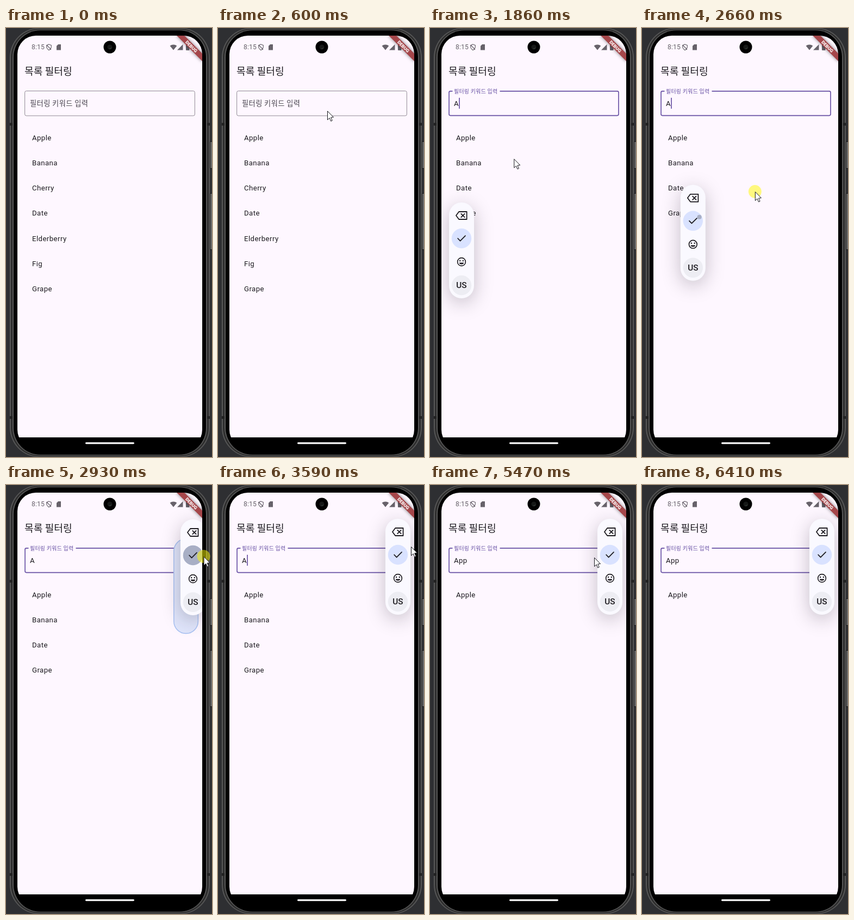
Write an HTML page with a canvas that moves like this. It is 379 by 787 pixels and loops after 6.61 s.

```html
<!DOCTYPE html>
<html lang="ko">
<head>
<meta charset="utf-8">
<title>List filtering</title>
<style>
html, body { margin: 0; width: 100%; height: 100%; overflow: hidden; background: #2e2f32; }
canvas { display: block; width: 379px; height: 787px; }
</style>
</head>
<body>
<canvas id="stage"></canvas>
<script>
const W = 379, H = 787, LOOP = 6610, TICK = 1000 / 15;
const SCREEN = { x: 21, y: 14, w: 340, h: 737 };
const DP = SCREEN.w / 411.4;
const BODY = 16 * DP, SPACING = 0.5 * DP;

const LATIN = 'Roboto, "Noto Sans", sans-serif';
const KOREAN = '"Noto Sans CJK KR", "Noto Sans CJK", "Noto Sans CJK JP", sans-serif';
const BG = '#fef7ff', INK = '#1d1b20', ACCENT = '#6750a4', STATUS = '#67626a';

const FRUITS = ['Apple', 'Banana', 'Cherry', 'Date', 'Elderberry', 'Fig', 'Grape'];
const KEYWORD = 'App', KEY_TIMES = [1400, 4195, 4660];
const CLICK = 860, FOCUS = 920, PANEL_IN = 990, GRAB = 2400, DOCK = 2933, DROP = 3060;

// Pointer stops: [time, x, y].
const STOPS = [
  [66, 364, 749], [470, 191, 106], [600, 201, 152], [1530, 201, 152], [2200, 108, 327],
  [GRAB, 77, 389], [2667, 208, 300], [2900, 364, 132], [3600, 355, 113],
  [5070, 355, 113], [5270, 304, 127], [5470, 302, 133], [6067, 341, 516], [6340, 352, 775]
];

const canvas = document.getElementById('stage');
const dpr = window.devicePixelRatio || 1;
canvas.width = W * dpr;
canvas.height = H * dpr;
const ctx = canvas.getContext('2d');

const clamp = v => Math.max(0, Math.min(1, v));
const ramp = (t, from, length) => clamp((t - from) / length);
const easeOut = p => 1 - (1 - p) ** 3;
const mix = (a, b, p) => a + (b - a) * p;

function box(x, y, w, h, r, fill) {
  ctx.beginPath();
  ctx.roundRect(x, y, w, h, r);
  if (fill) {
    ctx.fillStyle = fill;
    ctx.fill();
  }
}

function rect(x, y, w, h, fill) {
  ctx.fillStyle = fill;
  ctx.fillRect(x, y, w, h);
}

function disc(x, y, r, fill) {
  ctx.beginPath();
  ctx.arc(x, y, r, 0, 7);
  ctx.fillStyle = fill;
  ctx.fill();
}

function trace(points, close) {
  ctx.beginPath();
  points.forEach(([x, y]) => ctx.lineTo(x, y));
  if (close) ctx.closePath();
}

function poly(points, fill) {
  trace(points, true);
  ctx.fillStyle = fill;
  ctx.fill();
}

function stroke(color, width) {
  ctx.strokeStyle = color;
  ctx.lineWidth = width;
  ctx.stroke();
}

function label(text, x, y, font, color, spacing = 0) {
  ctx.font = font;
  ctx.letterSpacing = spacing + 'px';
  ctx.fillStyle = color;
  ctx.fillText(text, x, y);
}

function drawPhone() {
  rect(0, 0, W, H, '#2e2f32');
  for (const [y, h] of [[208, 50], [303, 104]]) {
    rect(375, y, 4, h, '#1c1c1d');
    rect(376, y + 1, 3, h - 2, '#666');
  }
  // The metal rim is light at both edges and dark between them.
  const rim = 7;
  for (let i = 0; i <= rim; i++) {
    const shade = i === rim ? 0 : 38 + 55 * Math.cos(i / (rim - 1) * Math.PI) ** 2;
    const x = 7 + i, y = i * 0.6;
    box(x, y, 382 - 2 * x, H - 2 * y, 54 - i * 0.7, `rgb(${shade},${shade},${shade})`);
  }
  for (const y of [174, 712]) {
    for (const x of [7, 370]) rect(x, y, 5, 5, '#222');
  }
}

function drawStatus() {
  label('8:15', 47, 39.3, '12.2px ' + LATIN, STATUS, 0.1);
  ctx.beginPath();
  ctx.moveTo(79, 30);
  ctx.lineTo(83.3, 31.6);
  ctx.quadraticCurveTo(84, 38, 79, 40.6);
  ctx.quadraticCurveTo(74, 38, 74.7, 31.6);
  ctx.closePath();
  ctx.moveTo(75, 31.5);
  ctx.lineTo(83, 39.5);
  stroke(STATUS, 1.2);

  poly([[96, 30], [101, 30], [101, 40.5], [93, 40.5], [93, 33]], STATUS);
  ctx.beginPath();
  ctx.moveTo(308, 40.5);
  ctx.arc(308, 40.5, 10, -Math.PI * 0.72, -Math.PI * 0.28);
  ctx.fillStyle = STATUS;
  ctx.fill();
  poly([[325.5, 30], [325.5, 40.5], [315, 40.5]], STATUS);
  box(331, 30, 6.5, 11, 1, STATUS);

  disc(191, 35, 11.5, '#000');
  disc(191, 35, 4.6, '#161817');
  ctx.beginPath();
  ctx.arc(191, 35, 3, 0.3, 2);
  stroke('#3d4541', 1);
}

function drawBanner() {
  ctx.save();
  ctx.translate(SCREEN.x + SCREEN.w, SCREEN.y);
  ctx.rotate(Math.PI / 4);
  ctx.shadowColor = 'rgba(0,0,0,.5)';
  ctx.shadowBlur = 6 * dpr;
  rect(-40 * DP, 28 * DP, 80 * DP, 12 * DP, '#a5464a');
  ctx.shadowColor = 'transparent';
  ctx.textAlign = 'center';
  label('DEBUG', 0, 31.2, `900 ${10.2 * DP}px ${LATIN}`, '#fff');
  ctx.restore();
}

function drawField(t, text, since) {
  const p = easeOut(ramp(t, FOCUS, 170));
  const line = mix(DP, 2 * DP, p), inset = line / 2;
  box(34.2 + inset, 115.1 + inset, 313.6 - line, 46.3 - line, 4 * DP - inset);
  stroke(p > 0 ? ACCENT : '#79747e', line);
  if (p > 0) rect(41.5, 113, 87 * p, 5, BG);

  const size = mix(1, 0.75, p);
  label('필터링 키워드 입력', 44, mix(143.2, 120, p), `${BODY * size}px ${KOREAN}`,
    p > 0 ? ACCENT : '#49454f', SPACING * size);
  label(text, 44, 143, `${BODY}px ${LATIN}`, INK, SPACING);
  if (p > 0 && (t - since) % 1000 < 500) {
    rect(44.2 + ctx.measureText(text).width, 128, 2 * DP, 20, ACCENT);
  }
}

function drawList(text) {
  const key = text.toLowerCase();
  FRUITS.filter(name => name.toLowerCase().includes(key)).forEach((name, i) =>
    label(name, 48, 205.6 + i * 56 * DP, `${BODY}px ${LATIN}`, INK, SPACING));
}

function drawDropZone(t) {
  if (t < DOCK - 30) return;
  ctx.globalAlpha = 1 - ramp(t, DROP, 150);
  box(308.8, 98.8, 44.6, 173.6, 22.3, '#e0e5fb');
  stroke('#abc3f3', 1.6);
  ctx.globalAlpha = 1;
}

function drawSmile(y) {
  ctx.beginPath();
  ctx.arc(0, y, 7.4, 0, 7);
  stroke(INK, 1.65);
  for (const x of [-2.9, 2.9]) disc(x, y - 2, 1.25, INK);
  ctx.beginPath();
  ctx.ellipse(0, y + 1.6, 4.2, 2.9, 0, 0, Math.PI);
  ctx.fillStyle = INK;
  ctx.fill();
}

function drawBackspace(y) {
  trace([[-10, y], [-4.8, y - 7], [9.6, y - 7], [9.6, y + 7], [-4.8, y + 7]], true);
  stroke(INK, 1.8);
  for (const s of [-3.2, 3.2]) {
    trace([[-0.7, y - s], [5.7, y + s]]);
    stroke(INK, 1.8);
  }
}

function drawCheck(t, y) {
  disc(0, y, 18.2, '#d9e2ff');
  const press = ramp(t, 2630, 170) * (1 - ramp(t, DROP, 200));
  if (press > 0) {
    ctx.save();
    ctx.clip();
    disc(15 * (1 - press), y - 9 * (1 - press), 19 * press, '#a8afc5');
    ctx.restore();
  }
  trace([[-6.8, y], [-2.4, y + 4.6], [7, y - 4.8]]);
  stroke(INK, 1.8);
}

function drawPanel(t) {
  if (t < PANEL_IN) return;
  const shown = easeOut(ramp(t, PANEL_IN, 300));
  const drag = ramp(t, GRAB, DOCK - GRAB) ** 3;
  const settle = easeOut(ramp(t, DROP, 200));
  const scale = mix(0.85, 1, shown);
  ctx.save();
  ctx.translate(mix(58, 344, drag) - 13 * settle, mix(408, 151, drag) - settle);
  ctx.scale(scale, scale);
  ctx.globalAlpha = clamp(shown * 1.3);
  ctx.shadowColor = 'rgba(30,28,40,.26)';
  ctx.shadowBlur = 34 * dpr;
  ctx.shadowOffsetY = 8 * dpr;
  box(-23, -88, 46, 176, 23, '#faf9ff');
  ctx.shadowColor = 'transparent';

  ctx.lineJoin = ctx.lineCap = 'round';
  drawBackspace(-64);
  drawCheck(t, -22);
  drawSmile(21);
  disc(0, 64, 18.2, '#ededf3');
  ctx.textAlign = 'center';
  label('US', 0, 69.4, '500 15.4px ' + LATIN, INK);
  ctx.restore();
}

function drawPointer(t) {
  const last = STOPS.length - 1;
  if (t < STOPS[0][0] || t > STOPS[last][0] + 30) return;
  const next = Math.max(1, STOPS.findIndex(([at]) => at > t));
  const i = t >= STOPS[last][0] ? last : next;
  const [t0, x0, y0] = STOPS[i - 1], [t1, x1, y1] = STOPS[i];
  const p = ramp(t, t0, t1 - t0);
  const x = mix(x0, x1, p), y = mix(y0, y1, p);

  const pressed = t >= CLICK && t < CLICK + 150 || t >= GRAB && t < DROP;
  if (pressed) disc(x, y, 12, 'rgba(255,250,0,.5)');
  ctx.save();
  ctx.translate(x + 0.5, y + 0.5);
  trace([[0, 0], [0, 16], [3.7, 12.6], [6.2, 18.4], [8.7, 17.3], [6.2, 11.6], [11, 11.2]], true);
  ctx.fillStyle = '#fff';
  ctx.fill();
  stroke('#16161c', 1);
  ctx.restore();
}

function draw(t) {
  const typed = KEY_TIMES.filter(at => t >= at);
  const text = KEYWORD.slice(0, typed.length);
  const since = typed.pop() || FOCUS;
  const { x, y, w, h } = SCREEN;
  ctx.setTransform(dpr, 0, 0, dpr, 0, 0);
  drawPhone();

  ctx.save();
  box(x, y, w, h + 20, 34);
  ctx.clip();
  ctx.beginPath();
  ctx.rect(x, y, w, h);
  ctx.clip();
  rect(x, y, w, h, BG);
  drawStatus();
  label('목록 필터링', 34, 85.6, `${22 * DP}px ${KOREAN}`, INK);
  drawField(t, text, since);
  drawList(text);
  drawDropZone(t);
  drawPanel(t);
  drawBanner();
  ctx.restore();

  box(146, 760, 90, 3.2, 1.6, '#f4f4f4');
  drawPointer(t);
}

const start = performance.now();
function frame() {
  const t = (performance.now() - start) % LOOP;
  draw(Math.floor((t + 12) / TICK) * TICK);
  requestAnimationFrame(frame);
}
frame();
</script>
</body>
</html>
```
